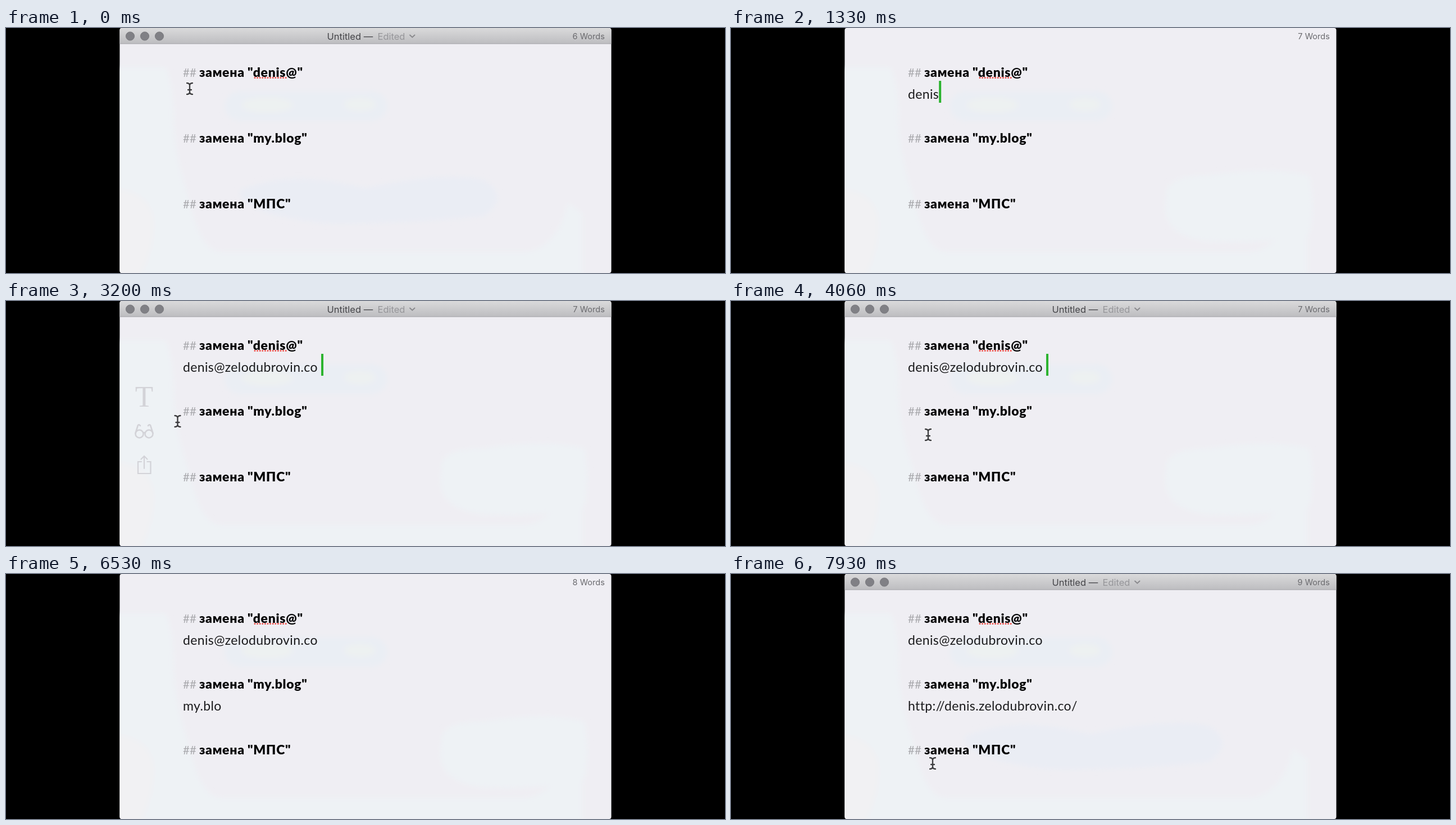
An HTML page that plays this animation: 1280x436 px, repeating every 8 s.

```html
<!DOCTYPE html>
<html lang="ru">
<head>
<meta charset="utf-8">
<title>Text replacement</title>
<style>
  html, body { margin: 0; width: 100%; height: 100%; overflow: hidden; background: #000; }
  svg { display: block; width: 1280px; height: 436px; }
  text { white-space: pre; }
  .body { font: 400 23px Lato, "Open Sans", sans-serif; letter-spacing: .37px; fill: #1a1a1c; }
  .head { font: 900 23px Lato, "Open Sans", sans-serif; letter-spacing: .7px; fill: #050506; }
  .hash { font: 400 20.5px Lato, "Open Sans", sans-serif; fill: #a9a9ad; }
  .title { font: 400 16.5px Inter, Roboto, sans-serif; fill: #454549; }
  .words { font: 400 14.6px Inter, Roboto, sans-serif; fill: #6a6a6e; text-anchor: end; }
  .serif { font: 400 53px "Liberation Serif", serif; fill: #d3d3d8; text-anchor: middle; }
  .line { fill: none; stroke-linecap: round; }
</style>
</head>
<body>
<svg viewBox="0 0 1280 436">
  <defs>
    <linearGradient id="metal" x2="0" y2="1">
      <stop offset="0" stop-color="#dadadb"/>
      <stop offset="1" stop-color="#bdbdc0"/>
    </linearGradient>
    <filter id="soft" x="-20%" y="-20%" width="140%" height="140%">
      <feGaussianBlur stdDeviation="5"/>
    </filter>
    <clipPath id="frame"><rect x="202.4" width="875.2" height="436" rx="4"/></clipPath>
  </defs>

  <rect width="1280" height="436"/>
  <g clip-path="url(#frame)">
    <rect x="202" width="876" height="436" fill="#efeef3"/>
    <g filter="url(#soft)">
      <path fill="#eef2f5" d="M190 70 H285 Q300 110 298 160 Q300 230 325 300 Q345 395 380 398 H930 Q985 385 1000 310 L1026 330 V440 H190Z"/>
      <path fill="#f1f1f3" d="M190 285 Q262 290 264 350 Q262 400 240 440 H190Z"/>
      <rect x="390" y="113" width="288" height="52" rx="26" fill="#eaeef4"/>
      <g fill="#edf1f1">
        <ellipse cx="465" cy="137" rx="46" ry="14"/><ellipse cx="630" cy="136" rx="28" ry="12"/>
      </g>
      <path id="blue" fill="#eaedf4" d="M415 290 Q500 250 640 285 Q780 255 850 270 Q900 300 850 335 Q700 350 560 347 Q420 330 415 290Z"/>
      <path id="pale" fill="#eef2f5" d="M775 300 Q770 262 850 262 Q960 245 1030 262 Q1040 320 1030 365 Q960 385 850 380 Q760 370 775 300Z"/>
    </g>

    <g id="bar">
      <rect x="202" width="876" height="28" fill="url(#metal)"/>
      <rect x="202" y="27.5" width="876" height="1" fill="#a4a4a8"/>
      <g fill="#808085" stroke="#6f6f74" stroke-width=".8">
        <circle cx="221" cy="14.5" r="7.6"/><circle cx="247" cy="14.5" r="7.6"/><circle cx="273" cy="14.5" r="7.6"/>
      </g>
      <text class="title" x="571.5" y="20.5">Untitled —</text>
      <g id="edited">
        <text class="title" x="661.5" y="20.5" style="fill:#96969a">Edited</text>
        <path class="line" stroke="#88888c" stroke-width="1.8" d="M719 12.5 l4.3 4 4.3 -4"/>
      </g>
    </g>
    <text id="words" class="words" x="1066" y="20"></text>

    <g id="tools">
      <text class="serif" x="246" y="188">T</text>
      <g class="line" stroke="#d3d3d8" stroke-width="2.6">
        <circle cx="237.5" cy="236.5" r="7"/><circle cx="254.5" cy="236.5" r="7"/>
        <path d="M244.5 235 q1.5 -2 3 0 M230.5 235 L235 221 q2 -2 4 1 M261.5 235 L257 221 q-2 -2 -4 1"/>
        <path stroke-width="2.2" d="M241 286 h-6 v21 h22.5 v-21 h-6 M246 298 V276 M240.5 281.5 L246 276 l5.5 5.5"/>
      </g>
    </g>

    <g id="heads"></g>
    <path class="line" stroke="#ee4f49" stroke-width="3" stroke-dasharray="0 4.6" d="M443 88.5 H502"/>
    <text id="first" class="body" x="315" y="126"></text>
    <text id="second" class="body" x="315" y="243"></text>
    <rect id="caret" width="4" height="39" fill="#2bb32e"/>
    <g id="mouse" class="line">
      <path id="beam" stroke="#fff" stroke-opacity=".6" stroke-width="4.4" d="M-5 -10 Q-1 -10 0 -7 Q1 -10 5 -10 M0 -7 V7 M-5 10 Q-1 10 0 7 Q1 10 5 10 M-3 2 H3"/>
    </g>
  </g>
</svg>
<script>
const LOOP = 8000, STEP = LOOP / 120;
const MAIL = 'denis@zelodubrovin.co', SITE = 'http://denis.zelodubrovin.co/';
const $ = id => document.getElementById(id);
const [bar, edited, words, tools, heads, first, second, caret, mouse, blue, pale] =
  ['bar', 'edited', 'words', 'tools', 'heads', 'first', 'second', 'caret', 'mouse', 'blue', 'pale'].map($);
const pen = document.createElement('canvas').getContext('2d');
pen.font = '400 23px Lato, "Open Sans", sans-serif';
pen.letterSpacing = '0.37px';

// dark stroke on top of the pale halo
const ink = $('beam').cloneNode();
ink.removeAttribute('id');
ink.setAttribute('stroke', '#3d3d40');
ink.setAttribute('stroke-opacity', 1);
ink.setAttribute('stroke-width', 2.4);
mouse.append(ink);

function addText(cls, x, y, str) {
  const node = document.createElementNS('http://www.w3.org/2000/svg', 'text');
  node.setAttribute('class', cls);
  node.setAttribute('x', x);
  node.setAttribute('y', y);
  node.textContent = str;
  heads.append(node);
}
['denis@', 'my.blog', 'МПС'].forEach((key, i) => {
  const y = 86.5 + i * 117.2;
  addText('hash', 315, y, '##');
  addText('head', 344, y, 'замена');
  addText('head', 430, y, `"${key}"`);
});

const typing1 = [[0, ''], [330, 'd'], [600, 'de'], [860, 'den'], [1130, 'deni'],
  [1330, 'denis'], [1800, 'denis@'], [1860, MAIL + ' ']];
const typing2 = [[0, ''], [5330, 'm'], [5660, 'my'], [5800, 'my.'], [6060, 'my.b'],
  [6260, 'my.bl'], [6460, 'my.blo'], [6600, 'my.blog'], [6730, SITE + ' ']];
const counts = [[0, 6], [330, 7], [5330, 8], [6730, 9]];
const caretOn = [[130, 2400], [2930, 3530], [4060, 4660], [5330, 6460], [6600, 7400]];
const barKeys = [[130, 1], [600, 0], [2860, 0], [3130, 1], [5800, 1], [6300, 0], [7530, 0], [7860, 1]];
const toolKeys = [[2860, 0], [3130, 1], [3330, 1], [3660, 0]];
const mouseOn = [[0, 200], [2860, 5330], [7400, LOOP]];
const mouseKeys = [[200, 327, 108], [2860, 327, 112], [3060, 310, 170], [3200, 305.5, 214],
  [3460, 330, 228], [3660, 350, 236], [3800, 351, 238], [7400, 351, 238], [7600, 351, 250], [7870, 359, 337]];

const latest = (list, t) => list.filter(e => e[0] <= t).pop()[1];
const within = (list, t) => list.some(([a, b]) => t >= a && t < b);
const show = (node, on) => node.style.display = on ? '' : 'none';

function mix(keys, t, col = 1) {
  const i = keys.findIndex(k => k[0] > t);
  if (i < 0) return keys[keys.length - 1][col];
  if (i === 0) return keys[0][col];
  const [a, b] = [keys[i - 1], keys[i]];
  return a[col] + (b[col] - a[col]) * (t - a[0]) / (b[0] - a[0]);
}

function draw(now) {
  // 15 steps a second, each starting on a whole 10 ms
  const t = Math.floor(((now % LOOP) + 7) / STEP) * STEP % LOOP;
  const line1 = latest(typing1, t), line2 = latest(typing2, t);
  first.textContent = line1;
  second.textContent = line2;
  words.textContent = latest(counts, t) + ' Words';
  const shown = mix(barKeys, t);
  bar.style.opacity = shown;
  edited.style.opacity = shown * shown;
  tools.style.opacity = mix(toolKeys, t);

  const low = t >= 5330;
  caret.setAttribute('x', 315 + pen.measureText(low ? line2 : line1).width);
  caret.setAttribute('y', low ? 211.5 : 94);
  show(caret, within(caretOn, t));

  mouse.setAttribute('transform', `translate(${mix(mouseKeys, t)} ${mix(mouseKeys, t, 2)})`);
  show(mouse, within(mouseOn, t));

  const early = t < 600 || t >= 7800;
  show(blue, early);
  show(pale, !early);
}

function tick() {
  draw(performance.now());
  requestAnimationFrame(tick);
}
tick();
</script>
</body>
</html>
```
